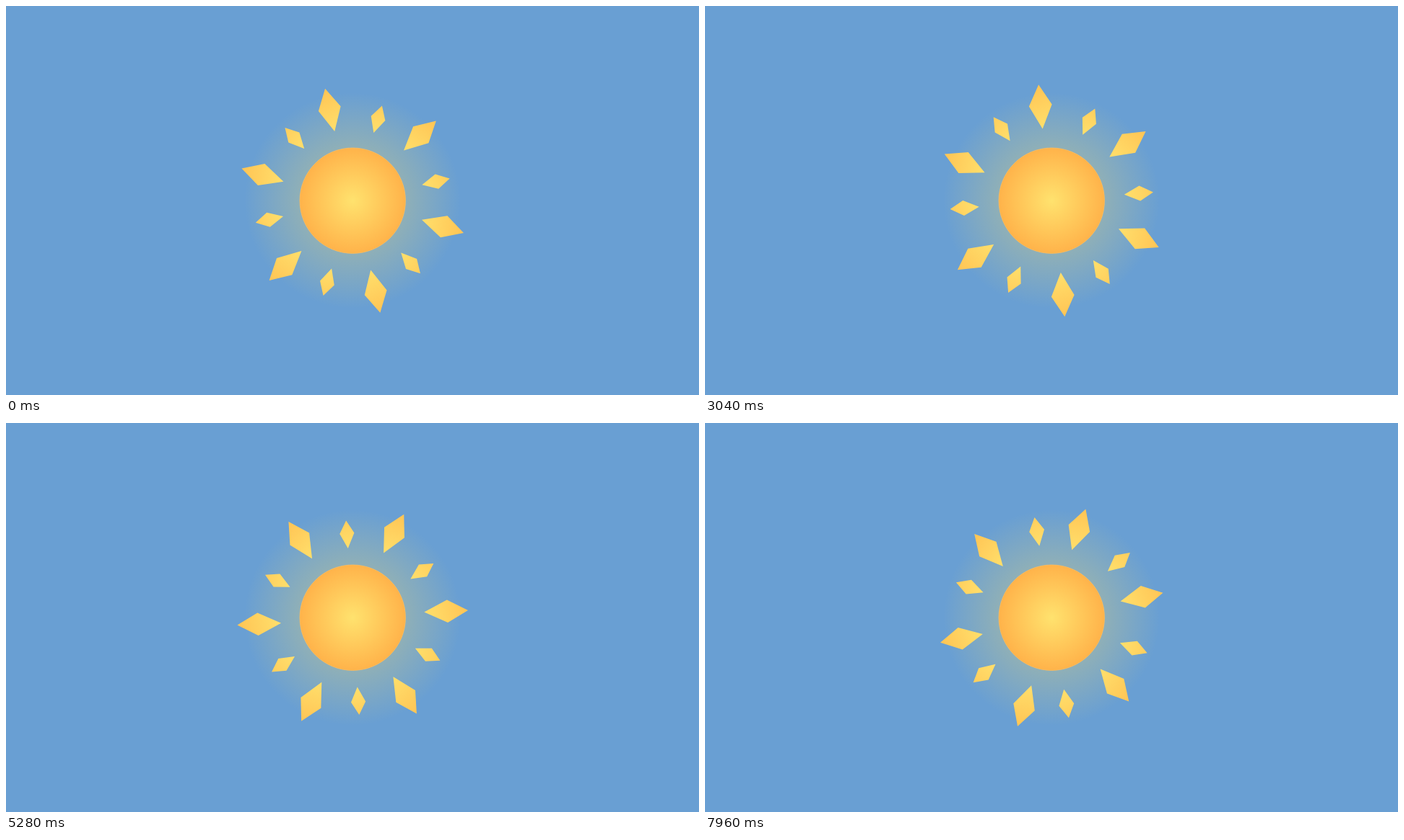
Write an HTML page that moves like this. It is 960 px wide and 540 px high and loops after 8000 ms.

```html
<!DOCTYPE html>
<html lang="en">
<head>
<meta charset="utf-8">
<title>Sun</title>
<style>
  html, body { margin: 0; width: 100%; height: 100%; overflow: hidden; background: #699fd3; }
  svg { display: block; width: 100vw; height: 100vh; }
</style>
</head>
<body>
<svg viewBox="-480 -270 960 540">
  <defs>
    <radialGradient id="glow">
      <stop offset="0" stop-color="#ffe066" stop-opacity=".5"/>
      <stop offset="1" stop-color="#ffe066" stop-opacity="0"/>
    </radialGradient>
    <radialGradient id="disc">
      <stop offset="0" stop-color="#ffe26e"/>
      <stop offset="1" stop-color="#ffb34a"/>
    </radialGradient>
    <linearGradient id="rayFill" gradientUnits="userSpaceOnUse" x1="4" y1="-99" x2="-8" y2="-155">
      <stop offset="0" stop-color="#ffe06c"/>
      <stop offset="1" stop-color="#ffc656"/>
    </linearGradient>
  </defs>
  <circle r="150" fill="url(#glow)"/>
  <g id="rays" fill="url(#rayFill)"></g>
  <circle cx=".2" cy=".2" r="73.2" fill="url(#disc)" stroke="#ffbd5e" stroke-width=".8"/>
</svg>
<script>
  const LOOP = 8000, STEP = 40;
  const SPIN = 0.04169; // degrees per ms

  // Each set holds six diamonds that pulse and sway around the centre.
  const sets = [
    { inner: 99.1, mid: 131.2, tip: 159.7, half: 15.7, shift: -3.5,
      angle: 47.35, sway: 0.95, grow: 0.0177, period: 480, peak: 110 },
    { inner: 99.2, mid: 120.4, tip: 138.7, half: 10.35, shift: 0,
      angle: 17.5, sway: 1.93, grow: 0.035, period: 360, peak: 100 }
  ];

  const NS = 'http://www.w3.org/2000/svg';
  const add = (parent, name) => parent.appendChild(document.createElementNS(NS, name));
  const rays = document.getElementById('rays');

  for (const s of sets) {
    s.group = add(rays, 'g');
    const points = [
      [s.shift, -s.tip], [s.shift + s.half, -s.mid],
      [s.shift, -s.inner], [s.shift - s.half, -s.mid]
    ].join(' ');
    for (let i = 0; i < 6; i++) {
      const ray = add(s.group, 'polygon');
      ray.setAttribute('points', points);
      ray.setAttribute('transform', `rotate(${i * 60})`);
    }
  }

  function draw(t) {
    for (const s of sets) {
      const wave = Math.cos(2 * Math.PI * (t - s.peak) / s.period);
      const angle = s.angle + SPIN * t + s.sway * wave;
      const scale = 1 + s.grow * wave;
      s.group.setAttribute('transform', `translate(.2 .2) rotate(${angle}) scale(${scale})`);
    }
  }

  function tick() {
    const t = performance.now() % LOOP;
    draw(Math.floor(t / STEP) * STEP);
    requestAnimationFrame(tick);
  }

  draw(0);
  requestAnimationFrame(tick);
</script>
</body>
</html>
```
